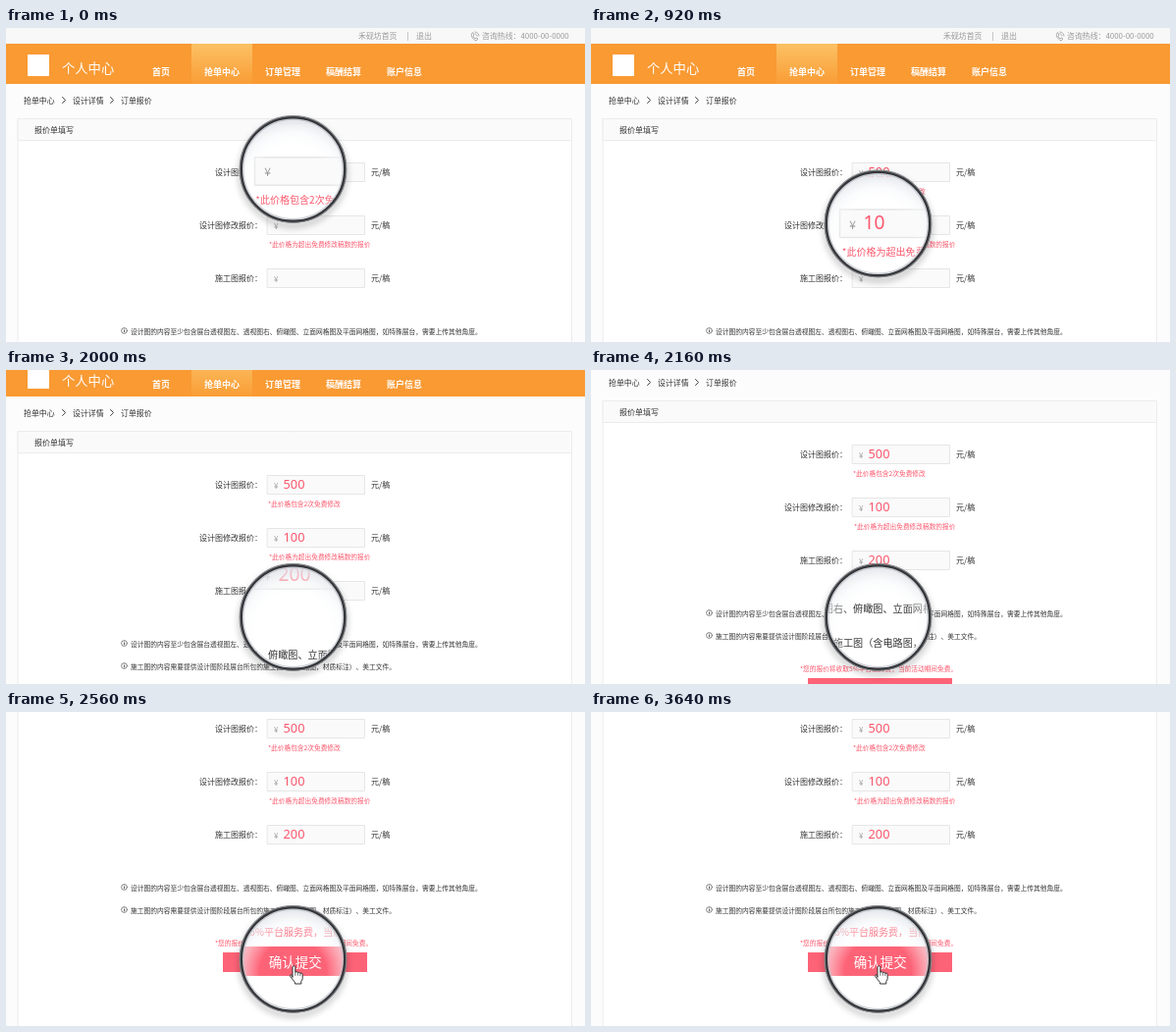
Write an HTML page with a canvas that moves like this. It is 590 px wide and 320 px high and loops after 4000 ms.

```html
<!DOCTYPE html>
<html lang="zh-CN">
<head>
<meta charset="utf-8">
<style>
html, body { margin: 0; width: 100%; height: 100%; overflow: hidden; background: #fcfcfc; }
canvas { display: block; }
</style>
</head>
<body>
<canvas width="590" height="320"></canvas>
<script>
const ctx = document.querySelector('canvas').getContext('2d');
const LOOP = 4000, W = 590, H = 320, LENS_X = 292.5, ZOOM = 1.5;
const PINK = '#fb566b', INK = '#333', GREY = '#999';
const CJK = '"Noto Sans CJK SC", "Noto Sans CJK", "Noto Sans", sans-serif';
const LATIN = '"Noto Sans", sans-serif';

const easeOut = (t, start, length) => {
  const p = Math.min(1, Math.max(0, (t - start) / length));
  return 1 - (1 - p) ** 3;
};

// Part of the value typed so far, one digit per step.
const typed = (value, t, start, step) =>
  t < start ? '' : value.slice(0, Math.floor((t - start) / step) + 1);

function text(str, x, y, size, color = INK, weight = 400, align = 'left', family = CJK) {
  ctx.font = `${weight} ${size}px ${family}`;
  ctx.fillStyle = color;
  ctx.textAlign = align;
  ctx.textBaseline = 'middle';
  ctx.fillText(str, x, y);
}

function box(x, y, w, h, fill, border) {
  ctx.fillStyle = fill;
  ctx.fillRect(x, y, w, h);
  if (!border) return;
  ctx.strokeStyle = border;
  ctx.lineWidth = 1;
  ctx.strokeRect(x + .5, y + .5, w - 1, h - 1);
}

function path(d, stroke, width, fill) {
  const p = new Path2D(d);
  if (fill) { ctx.fillStyle = fill; ctx.fill(p); }
  ctx.strokeStyle = stroke;
  ctx.lineWidth = width;
  ctx.lineJoin = ctx.lineCap = 'round';
  ctx.stroke(p);
}

function circle(x, y, r, stroke, width) {
  ctx.beginPath();
  ctx.arc(x, y, r, 0, 7);
  ctx.strokeStyle = stroke;
  ctx.lineWidth = width;
  ctx.stroke();
}

function header() {
  box(0, 0, W, 16, '#f8f8f8');
  text('禾砚坊首页', 359, 8, 7.9, GREY);
  text('|', 408.5, 7.5, 8, GREY);
  text('退出', 418, 8, 8, GREY);
  path('M475 5c-2 2 0 6 4 8l2-2-2-1-1 1c-1-1-2-2-2-3l1-1-1-2zM478 4c2 0 4 2 4 4M478 6c1 0 2 1 2 2', GREY, .8);
  text('咨询热线：4000-00-0000', 485, 8, 7.9, GREY);

  box(0, 16, W, 41, '#f99a33');
  const tab = ctx.createLinearGradient(0, 16, 0, 57);
  tab.addColorStop(0, '#fcc164');
  tab.addColorStop(1, '#f99d36');
  box(189, 16, 62, 41, tab);
  box(22, 27, 22, 22, '#fff');
  text('个人中心', 57, 41, 13.3, '#fff', 500);
  [['首页', 149], ['抢单中心', 202], ['订单管理', 264], ['稿酬结算', 326], ['账户信息', 388]]
    .forEach(([label, x]) => text(label, x, 44.5, 9, '#fff', 700));

  [['抢单中心', 18], ['设计详情', 68], ['订单报价', 117]]
    .forEach(([label, x]) => text(label, x, 73.5, 7.9, INK, 500));
  path('M57.5 70.5l3 3-3 3M106.5 70.5l3 3-3 3', INK, .9);
}

function row(label, y, value) {
  text(label, 261, y, 8, INK, 400, 'right');
  box(266, y - 10, 100, 20, '#fafafa', '#e6e6e6');
  text('¥', 273, y + .5, 8, GREY);
  text(value, 282.5, y + .5, 12.8, PINK, 400, 'left', LATIN);
  text('元/稿', 372, y, 8);
}

function info(str, y) {
  circle(120.5, y - .5, 2.9, INK, .6);
  box(120.1, y - 1, .8, 2.2, INK);
  box(120.1, y - 2.3, .8, .8, INK);
  // a zero-width space keeps adjacent punctuation at full width
  text(str.replace('）、', '）\u200b、'), 127, y, 6.75);
}

function page(t, scroll) {
  ctx.save();
  ctx.translate(0, -scroll);
  box(0, 0, W, 500, '#fcfcfc');
  header();
  box(12, 92, 565, 400, '#fff', '#ececec');
  box(12, 92, 565, 23, '#fafafa', '#ececec');
  text('报价单填写', 29, 103.5, 8, INK, 500);

  row('设计图报价：', 147, typed('500', t, 40, 80));
  text('*此价格包含2次免费修改', 267, 166.5, 6.7, PINK);
  row('设计图修改报价：', 201, typed('100', t, 840, 80));
  text('*此价格为超出免费修改稿数的报价', 268, 220.5, 6.7, PINK);
  row('施工图报价：', 255, typed('200', t, 1400, 120));

  info('设计图的内容至少包含展台透视图左、透视图右、俯瞰图、立面网格图及平面网格图，如特殊展台，需要上传其他角度。', 309);
  info('施工图的内容需要提供设计图阶段展台所包的施工图（含电路图，材质标注）、美工文件。', 332);
  text('*您的报价将收取5%平台服务费，当前活动期间免费。', 213, 365, 6.7, PINK);
  box(221, 375, 147, 20, '#fd6377');
  text('确认提交', 294, 385.3, 9, '#fff', 500, 'center');
  ctx.restore();
}

function ripple(t) {
  for (const start of [2740, 3300]) {
    const p = (t - start) / 340;
    if (p > 0 && p < 1) circle(295.5, 257, 3 + 13 * p, `rgba(255,255,255,${.9 * (1 - p)})`, 2);
  }
}

function hand() {
  path('M292 270V260.3q0-1.6 1.4-1.6t1.4 1.6V265q1.6-.9 2.6.5 1.6-.7 2.4.6 2.4-.5 2.4 1.6v3.6q0 2-1.4 3.2V277H294.4v-1.6l-4.6-5.6q-.9-1.6.5-2.1z', '#333', 1, '#fff');
  path('M294.8 265v3.4M297.4 265.6v2.8M299.8 266.4v2.2', '#333', .7);
}

function lens(t, scroll, y) {
  // soft shadow below the rim
  ctx.save();
  ctx.shadowColor = 'rgba(0,0,0,.4)';
  ctx.shadowBlur = 7;
  ctx.shadowOffsetY = 4;
  circle(LENS_X, y, 53, '#555', 3);
  ctx.restore();

  ctx.save();
  ctx.beginPath();
  ctx.arc(LENS_X, y, 53, 0, 7);
  ctx.clip();
  ctx.save();
  ctx.translate(LENS_X, y);
  ctx.scale(ZOOM, ZOOM);
  ctx.translate(-LENS_X, -y - 1.7);
  page(t, scroll);
  ctx.restore();
  ripple(t);
  // haze is thickest at the top of the glass
  const glass = ctx.createRadialGradient(LENS_X, y + 14, 34, LENS_X, y + 14, 67);
  glass.addColorStop(0, 'rgba(255,255,255,0)');
  glass.addColorStop(.5, 'rgba(246,248,250,.5)');
  glass.addColorStop(1, 'rgba(220,224,230,.95)');
  ctx.fillStyle = glass;
  ctx.fillRect(LENS_X - 54, y - 54, 108, 108);
  ctx.restore();

  circle(LENS_X, y, 50.7, 'rgba(190,194,200,.75)', 1.4);
  circle(LENS_X, y, 54.2, '#85878b', 1.4);
  circle(LENS_X, y, 52.6, '#34363a', 2.2);
  if (t >= 2520) hand();
}

function frame(now) {
  const t = now % LOOP;
  const scroll = Math.round(Math.min(130, Math.max(0, (t - 1845) * .194)));
  const lensY = 144 + 55.5 * easeOut(t, 240, 400) + 52.5 * easeOut(t, 1000, 240);
  ctx.clearRect(0, 0, W, H);
  page(t, scroll);
  lens(t, scroll, lensY);
  requestAnimationFrame(frame);
}
frame(0);
</script>
</body>
</html>
```
